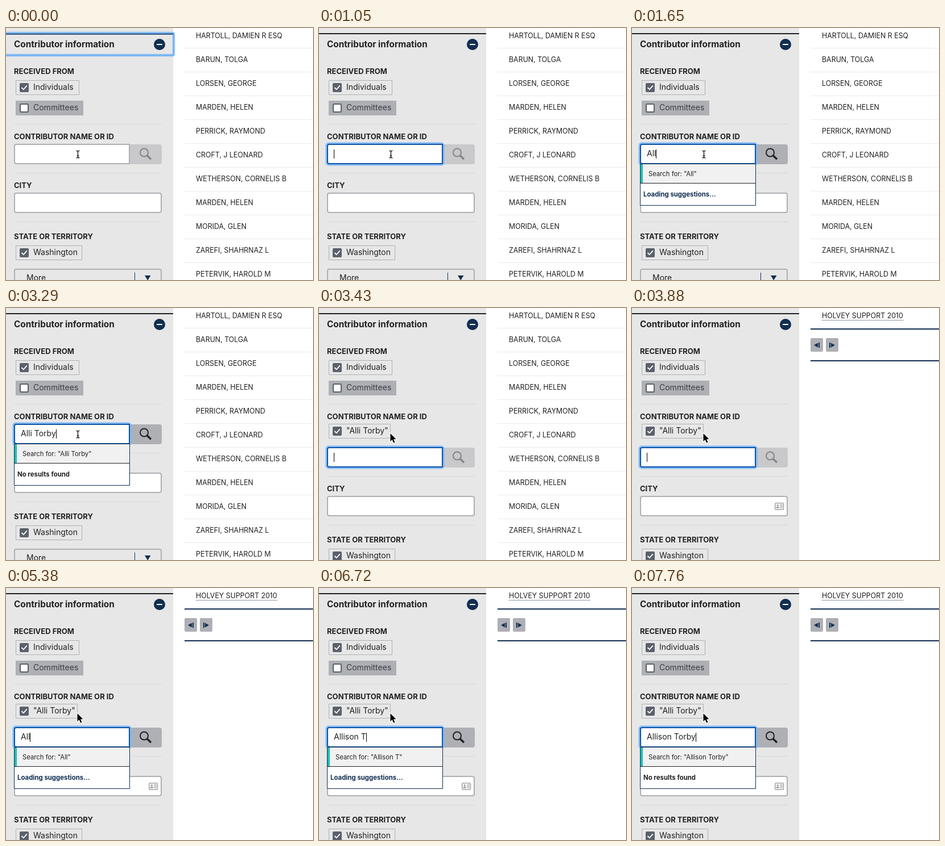
An HTML page with a canvas for the animation above (8000 ms loop, 540 px wide and 444 px high).

```html
<!DOCTYPE html>
<html lang="en">
<head>
<meta charset="utf-8">
<title>Contributor filter</title>
<style>
html, body { margin: 0; width: 100%; height: 100%; overflow: hidden; background: #fff; }
canvas { display: block; width: 540px; height: 444px; }
</style>
</head>
<body>
<canvas id="stage" width="540" height="444"></canvas>
<script>
const ctx = document.getElementById('stage').getContext('2d');
const LOOP = 8000;
const NAVY = '#112e51', INK = '#212121', GRAY = '#aeb0b5', SLATE = '#5b616b', PANEL = '#e7e7e7';

const people = [
  'HARTOLL, DAMIEN R ESQ', 'BARUN, TOLGA', 'LORSEN, GEORGE', 'MARDEN, HELEN',
  'PERRICK, RAYMOND', 'CROFT, J LEONARD', 'WETHERSON, CORNELIS B', 'MARDEN, HELEN',
  'MORIDA, GLEN', 'ZAREFI, SHAHRNAZ L', 'PETERVIK, HAROLD M'
];

// Each search: the text, the time of every key press, and the suggestion states.
const first = {
  name: 'Alli Torby',
  keys: [1200, 1350, 1500, 1800, 2100, 2400, 2550, 2700, 2840, 2990],
  loading: 1650, done: 3290
};
const second = {
  name: 'Allison Torby',
  keys: [4930, 5080, 5230, 5680, 5830, 5980, 6120, 6420, 6720, 6860, 7160, 7310, 7460],
  loading: 5380, done: 7760
};
const FOCUS = 150, SUBMIT = 3430, BUSY = 3730, LOADED = 3880;

const between = (t, a, b) => t >= a && t < b;

function rect(x, y, w, h, color) {
  ctx.fillStyle = color;
  ctx.fillRect(x, y, w, h);
}

function box(x, y, w, h, r, fill, stroke, line = 1) {
  ctx.beginPath();
  ctx.roundRect(x, y, w, h, r);
  if (fill) { ctx.fillStyle = fill; ctx.fill(); }
  if (stroke) { ctx.strokeStyle = stroke; ctx.lineWidth = line; ctx.stroke(); }
}

function poly(points, fill, stroke, line = 1) {
  ctx.beginPath();
  points.forEach(([x, y]) => ctx.lineTo(x, y));
  if (stroke) { ctx.closePath(); ctx.strokeStyle = stroke; ctx.lineWidth = line; ctx.stroke(); }
  ctx.fillStyle = fill;
  ctx.fill();
}

function text(str, x, y, size, weight = 400, color = INK) {
  ctx.font = `${weight} ${size}px Inter, Roboto, sans-serif`;
  ctx.fillStyle = color;
  ctx.fillText(str, x, y);
  return ctx.measureText(str).width;
}

const label = (str, y) => text(str, 14, y, 13, 700);
const rule = y => rect(14, y, 260, 1, '#d6d7d9');

function chip(str, y, w, checked = true) {
  if (checked) box(17.5, y + .5, w - 1, 25, 0, null, GRAY);
  else rect(17, y, w, 26, GRAY);
  if (checked) {
    box(24, y + 5, 16, 16, 2, SLATE);
    ctx.beginPath();
    ctx.moveTo(27.5, y + 13);
    ctx.lineTo(30.8, y + 16.3);
    ctx.lineTo(36.8, y + 9.3);
    ctx.strokeStyle = '#fff';
    ctx.lineWidth = 1.8;
    ctx.stroke();
  } else {
    box(25, y + 6, 14, 14, 2, '#fff', SLATE, 2);
  }
  text(str, 48, y + 17, 14, 400, checked ? INK : '#3a3d42');
}

function header(focused) {
  rect(0, 9, 294, 2, focused ? NAVY : INK);
  if (focused) {
    box(-6, 9, 301, 39, 2, null, 'rgba(120,180,250,.55)', 5);
    box(-6, 9, 301, 39, 2, null, '#6fb1f5', 2.5);
    rect(0, 10, 294, 1.5, NAVY);
  }
  text('Contributor information', 14, 34, 15.3, 700);
  ctx.beginPath();
  ctx.arc(270, 29, 10, 0, Math.PI * 2);
  ctx.fillStyle = NAVY;
  ctx.fill();
  rect(265, 28, 10, 2, '#fff');
}

function searchField(y, focused, typed, caret) {
  box(218, y + 1, 56, 35, [0, 4, 4, 0], typed ? GRAY : '#c9c9cb');
  ctx.strokeStyle = typed ? INK : '#858688';
  ctx.beginPath();
  ctx.arc(243, y + 15.5, 7, 0, Math.PI * 2);
  ctx.lineWidth = 2;
  ctx.stroke();
  ctx.beginPath();
  ctx.moveTo(248.2, y + 20.7);
  ctx.lineTo(255, y + 27.2);
  ctx.lineWidth = 3.4;
  ctx.stroke();

  if (focused) {
    box(14, y, 204, 36, 3, null, 'rgba(110,178,250,.45)', 6);
    box(14, y, 204, 36, 3, null, '#7db9f7', 3.5);
  }
  box(15, y + 1, 202, 34, [3, 0, 0, 3], '#fff', focused ? '#0f54a8' : GRAY, 2);
  const w = text(typed, 26, y + 22, 14);
  if (caret) rect(26 + Math.round(w), y + 10, 1, 16, '#000');
}

function suggestions(y, typed, status) {
  const h = status ? 73 : 34;
  rect(14, y, 204, h, '#fff');
  rect(15, y, 202, 33, '#f1f1f1');
  rect(15, y, 4, 33, '#1fbfb4');
  box(14.5, y - .5, 203, h, 0, null, NAVY);
  text(`Search for: "${typed}"`, 29, y + 21, 11.3);
  if (!status) return;
  rect(15, y + 33, 202, 1, INK);
  text(status, 20, y + 57, 11.4, 700, status[0] === 'L' ? NAVY : INK);
}

function contactIcon(y) {
  const c = '#a3a4a6';
  box(251.8, y + .8, 14.6, 11.4, 1.5, null, c, 1.6);
  ctx.beginPath();
  ctx.arc(256.3, y + 4.9, 1.8, 0, Math.PI * 2);
  ctx.fillStyle = c;
  ctx.fill();
  box(253.6, y + 7.2, 5.4, 2.8, 1, c);
  [3.2, 5.7, 8.2].forEach(d => rect(260.3, y + d, 4.4, 1.4, c));
}

function lowerFields(dy, icon) {
  rule(255 + dy);
  label('CITY', 282 + dy);
  box(15, 291 + dy, 258, 34, 3, '#fff', GRAY, 2);
  if (icon) contactIcon(302 + dy);
  rule(341 + dy);
  label('STATE OR TERRITORY', 372 + dy);
  chip('Washington', 383 + dy, 117);
  box(15, 425 + dy, 258, 34, 3, null, GRAY, 2);
  text('More', 36, 445 + dy, 14);
  rect(226, 431 + dy, 1, 24, NAVY);
  poly([[244, 436 + dy], [254.5, 436 + dy], [249.2, 444.5 + dy]], NAVY);
}

function results(busy) {
  people.forEach((name, i) => {
    text(name, 334, 18 + 42 * i, 12.4);
    rect(314, 35 + 42 * i, 226, 1, '#ebebeb');
  });
  if (busy) rect(314, 0, 226, 444, 'rgba(17,46,81,.7)');
}

function shortResults() {
  const w = text('HOLVEY SUPPORT 2010', 334, 18, 12.4);
  for (let x = 334; x < 334 + w; x += 2) rect(x, 21, 1, 1, NAVY);
  rect(314, 36, 226, 2, NAVY);
  rect(314, 92, 226, 2, NAVY);
  box(314, 53, 22, 24, 2, GRAY);
  box(341, 53, 22, 24, 2, GRAY);
  poly([[320, 65.5], [327, 61.5], [327, 69.5]], NAVY);
  rect(328, 61, 2, 9, NAVY);
  rect(347, 61, 2, 9, NAVY);
  poly([[357, 65.5], [350, 61.5], [350, 69.5]], NAVY);
}

function beam(x, y) {
  const path = () => {
    ctx.beginPath();
    ctx.moveTo(x - 3, y - 6.5);
    ctx.quadraticCurveTo(x, y - 6.5, x, y - 4);
    ctx.quadraticCurveTo(x, y - 6.5, x + 3, y - 6.5);
    ctx.moveTo(x, y - 4.5);
    ctx.lineTo(x, y + 4.5);
    ctx.moveTo(x - 3, y + 6.5);
    ctx.quadraticCurveTo(x, y + 6.5, x, y + 4);
    ctx.quadraticCurveTo(x, y + 6.5, x + 3, y + 6.5);
    ctx.moveTo(x - 2, y + 2.5);
    ctx.lineTo(x + 2, y + 2.5);
    ctx.stroke();
  };
  ctx.strokeStyle = '#fff';
  ctx.lineWidth = 3;
  path();
  ctx.strokeStyle = '#000';
  ctx.lineWidth = 1.2;
  path();
}

function arrow(x, y) {
  poly([[0, 0], [0, 14], [3.2, 11], [5.6, 16.4], [8, 15.4], [5.6, 10.2], [10, 10]]
    .map(([a, b]) => [x + a, y + b]), '#000', '#fff', 2);
}

function draw(t) {
  const sent = t >= SUBMIT;
  const dy = sent ? 41 : 0;
  const query = sent ? second : first;
  const typed = query.name.slice(0, query.keys.filter(k => t >= k).length);
  const focused = t >= FOCUS;
  const caret = focused && !between(t, 600, 1050) && !between(t, 4180, 4630);

  rect(0, 0, 540, 444, '#fff');
  rect(0, 0, 294, 444, PANEL);
  if (t < LOADED) results(t >= BUSY);
  else shortResults();

  header(!focused);
  label('RECEIVED FROM', 81);
  chip('Individuals', 92, 112);
  chip('Committees', 128, 119, false);
  rule(169);
  label('CONTRIBUTOR NAME OR ID', 196);
  if (sent) chip(`"${first.name}"`, 204, 109);
  lowerFields(dy, t >= BUSY);
  searchField(204 + dy, focused, typed, caret);
  if (typed.length > 2) {
    const status = t >= query.done ? 'No results found'
      : t >= query.loading ? 'Loading suggestions...' : '';
    suggestions(240 + dy, typed, status);
  }
  if (sent) arrow(125.5, 221);
  else beam(126.5, 222.5);
}

const start = performance.now();
function tick() {
  draw((performance.now() - start) % LOOP);
  requestAnimationFrame(tick);
}
tick();
</script>
</body>
</html>
```
